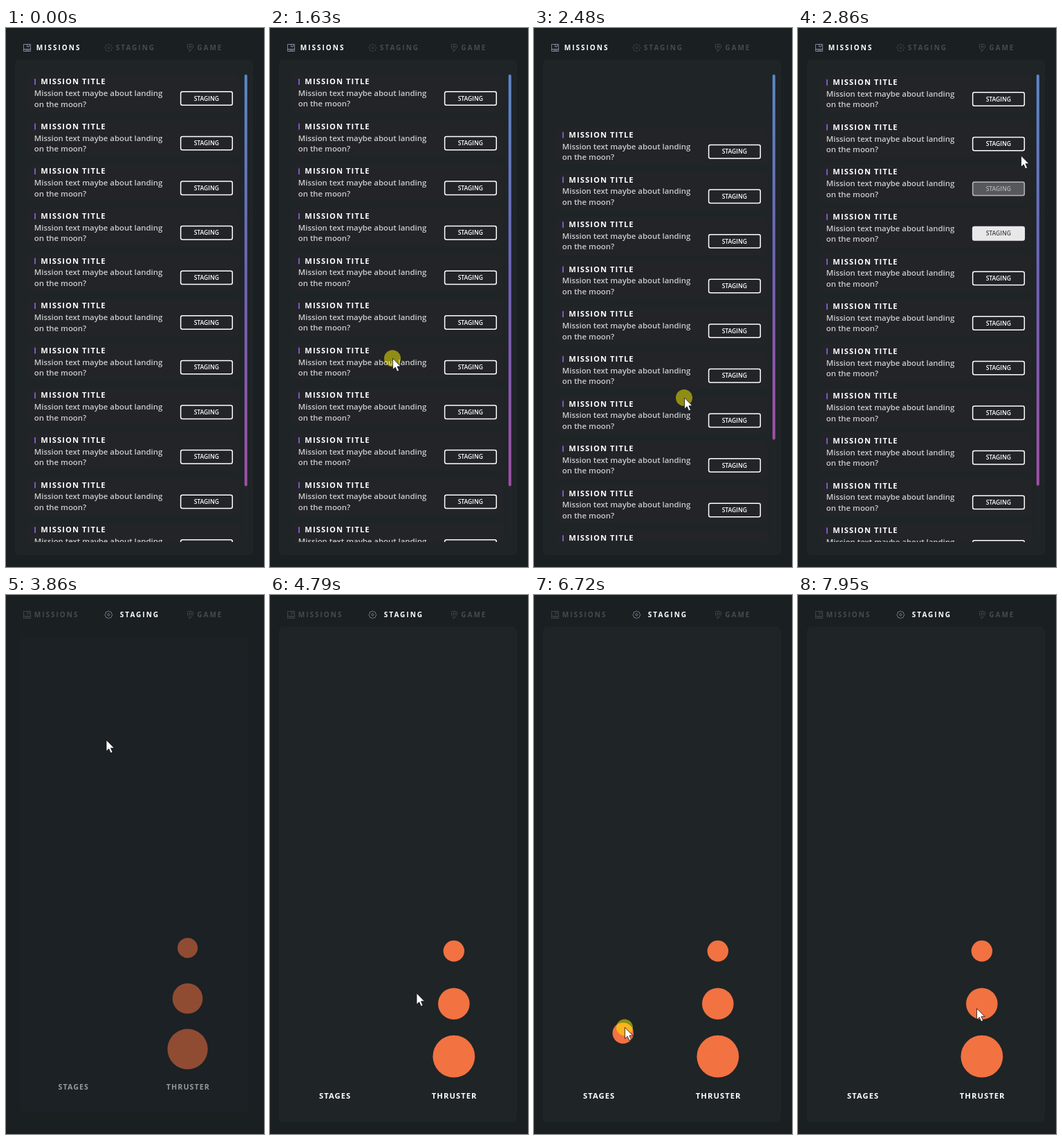
These frames come from a looping animation (373 px wide and 777 px high, 8 s). An HTML page:

```html
<!DOCTYPE html>
<html lang="en">
<head>
<meta charset="utf-8">
<title>Missions and staging</title>
<style>
  html, body { margin: 0; height: 100%; overflow: hidden; background: #1a1f22; }
  svg { position: fixed; left: 0; top: 0; font-family: "Open Sans", sans-serif; }
  .title { font-weight: 700; font-size: 11.15px; letter-spacing: 1.1px; fill: #fff; }
  .body { font-weight: 600; font-size: 11.37px; fill: #c9cbcc; }
  .label { font-weight: 600; font-size: 8.6px; text-anchor: middle; }
  .tab { font-weight: 700; font-size: 10px; letter-spacing: 2px; }
  .icon { fill: none; stroke-width: .8; }
  .panel { fill: #1f2427; }
  .thruster { fill: #f27241; }
</style>
</head>
<body>
<svg id="stage" width="373" height="777" viewBox="0 0 373 777">
  <defs>
    <linearGradient id="glow" x1="0" y1="0" x2="0" y2="1">
      <stop offset="0" stop-color="#5b87c9"/>
      <stop offset=".5" stop-color="#6f62b8"/>
      <stop offset="1" stop-color="#a04fa5"/>
    </linearGradient>
    <clipPath id="view"><rect x="32" y="66" width="306" height="675"/></clipPath>
  </defs>
  <g id="tabs"></g>
  <g id="missions">
    <rect class="panel" x="13" y="46" width="344" height="714" rx="6"/>
    <g clip-path="url(#view)"><g id="list"></g></g>
    <rect x="345" y="67" width="4" height="674" rx="2" fill="#212529"/>
    <rect id="thumb" x="344.8" width="4" rx="2" fill="url(#glow)"/>
  </g>
  <g id="staging">
    <rect class="panel" x="13" y="46" width="344" height="714" rx="6"/>
    <g id="thrusters"></g>
    <text class="title" x="71" y="726.4">STAGES</text>
    <text class="title" x="233.8" y="726.4">THRUSTER</text>
    <circle id="dragged" class="thruster"/>
  </g>
  <g id="cursor">
    <circle id="press" r="12" fill="#fff500" fill-opacity=".5"/>
    <path d="M.5 0V16.3L4.2 12.8 6.8 18.8 9.6 17.6 7 11.7H12Z" fill="#fff" stroke="#111" stroke-width=".8"/>
  </g>
</svg>
<script>
const LOOP = 8000, STEP = 77.03, PITCH = 64.6, SWITCH = 3650, MAX_SCROLL = 91;
const $ = id => document.getElementById(id);
const set = (el, attrs) => { for (const k in attrs) el.setAttribute(k, attrs[k]); };
const clamp = v => Math.min(1, Math.max(0, v));
const range = n => [...Array(n).keys()];

// Pointer stops as [time, x, y], with an eased move between neighbours.
const stops = [
  [240, 366, 88], [940, 113, 417], [1633, 177, 476.2], [1990, 192, 400],
  [2481, 217, 533], [2866, 322, 184], [3500, 190, 78], [3640, 176, 29],
  [3868, 144.5, 209], [4360, 114, 405], [5120, 276, 686], [5480, 272, 666],
  [5562, 252, 651.5], [5900, 165, 548], [6300, 268, 505], [6900, 92, 657],
  [7800, 236, 556], [7947, 258, 596]
];
function pointer(t) {
  const next = Math.max(1, stops.findIndex(s => s[0] >= t));
  const [t0, x0, y0] = stops[next - 1], [t1, x1, y1] = stops[next];
  const u = clamp((t - t0) / (t1 - t0)), e = u * u * (3 - 2 * u);
  return { x: x0 + (x1 - x0) * e, y: y0 + (y1 - y0) * e };
}

const thrusters = range(3).map(i => ({ cx: 265.8, cy: 513.2 + 76 * i, r: 7.6 * (i + 2) }));
const scrolling = { from: 1633, to: 2500 };
const drags = [
  { from: 5480, to: 5960, part: thrusters[2] },
  { from: 6300, to: 7200, part: thrusters[0] }
];
const during = (span, t) => t >= span.from && t < span.to;

// The list follows the pressed pointer, then settles back to the top.
function listOffset(t) {
  if (t < scrolling.from) return 0;
  const held = Math.min(t, scrolling.to);
  const pull = 1.35 * (pointer(held).y - pointer(scrolling.from).y);
  return Math.max(-MAX_SCROLL, pull) * Math.exp((held - t) / 85);
}

// Buttons light up one after another as the pointer sweeps upwards.
function hoverAmount(row, t) {
  const peak = 2866 + (3 - row) * 110;
  return row < 1 || row > 3 ? 0 : clamp(1 - Math.abs(t - peak) / 150);
}

const gear = range(48).map(i => {
  const a = i * Math.PI / 24, r = 5 + .4 * Math.cos(8 * a);
  return `${148.3 + r * Math.cos(a)} ${28.5 + r * Math.sin(a)}`;
}).join("L");
const tabs = [
  { name: "MISSIONS", x: 40.8, shift: 3,
    icon: "M25.5 23.5H35.5V33.5H25.5ZM25.5 30.5H35.5M30.5 23.5V27H33.5V23.5M27.5 32H34" },
  { name: "STAGING", x: 158.8, shift: 6,
    icon: `M${gear}ZM148.3 26.5L150 28.4 148.3 30.3 146.6 28.4Z` },
  { name: "GAME", x: 276.3, shift: 3,
    icon: "M262.5 24L264 23.5H269L270.5 25V28L268 30.5V32L265 33.8V30.5L262.5 29ZM265 26H268V28H265Z" }
];
$("tabs").innerHTML = tabs.map(t =>
  `<path class="icon" d="${t.icon}"/><text class="tab" y="32.2">${t.name}</text>`).join("");

$("thrusters").innerHTML = thrusters.map(c =>
  `<circle class="thruster" cx="${c.cx}" cy="${c.cy}" r="${c.r}"/>`).join("");

$("list").innerHTML = range(12).map(i => `
  <g transform="translate(0 ${i * PITCH})">
    <rect x="32" y="66.5" width="305" height="54.5" rx="6" fill="#222428"/>
    <rect x="41" y="73" width="2" height="9" rx=".6" fill="#7d58c0"/>
    <text class="title" x="50.3" y="81.3">MISSION TITLE</text>
    <text class="body" x="40.8" y="98">Mission text maybe about landing</text>
    <text class="body" x="40.8" y="113.5">on the moon?</text>
    <rect class="button" x="252.6" y="91.8" width="74.7" height="19.4" rx="2.5" stroke-width="1.5"/>
    <text class="label" x="289.8" y="104.7">STAGING</text>
  </g>`).join("");
const buttons = [...document.querySelectorAll(".button")];

function paintTabs(active) {
  tabs.forEach((tab, i) => {
    const on = i === active, [icon, text] = [...$("tabs").children].slice(i * 2);
    set(icon, { stroke: on ? "#a09cb4" : "#4c5053" });
    set(text, { x: tab.x + (on ? tab.shift : 0), fill: on ? "#fff" : "#474b4e" });
  });
}

function paintButton(button, hover) {
  const shade = 255 - 185 * clamp(1.6 * hover);
  set(button, {
    fill: `rgba(232,232,232,${hover})`,
    stroke: hover > .6 ? "#e8e8e8" : "#fff",
    "stroke-opacity": 1 - 1.9 * hover * (1 - hover)
  });
  set(button.nextElementSibling, { fill: `rgb(${shade},${shade},${shade})` });
}

// Fade a screen while scaling it about the panel centre.
function paintScreen(el, opacity) {
  const s = .911 + .089 * opacity;
  set(el, { opacity, transform: `translate(185 403) scale(${s}) translate(-185 -403)` });
}

function paint(t) {
  paintTabs(t < SWITCH ? 0 : 1);
  paintScreen($("missions"), 1 - clamp((t - SWITCH) / 100));
  paintScreen($("staging"), clamp((t - SWITCH - 100) / 215));

  const offset = listOffset(t);
  set($("list"), { transform: `translate(0 ${offset})` });
  set($("thumb"), {
    y: 67 + .88 * Math.max(0, -offset),
    height: 593.5 - .875 * Math.max(0, offset)
  });
  buttons.forEach((button, row) => paintButton(button, hoverAmount(row, t)));

  const { x, y } = pointer(t);
  const drag = drags.find(d => during(d, t));
  set($("cursor"), { transform: `translate(${x} ${y})`, opacity: t < stops[0][0] ? 0 : 1 });
  set($("press"), { opacity: drag || during(scrolling, t) ? 1 : 0 });
  set($("dragged"), { r: 0 });
  if (drag) {
    const grab = pointer(drag.from), { cx, cy, r } = drag.part;
    set($("dragged"), { cx: cx + x - grab.x, cy: cy + y - grab.y, r });
  }
}

// The picture advances in even steps after a short hold.
function tick() {
  const step = Math.floor((performance.now() % LOOP - 160) / STEP);
  paint(step < 0 ? 0 : Math.min(170 + step * STEP, stops[stops.length - 1][0]));
  requestAnimationFrame(tick);
}
tick();
</script>
</body>
</html>
```
